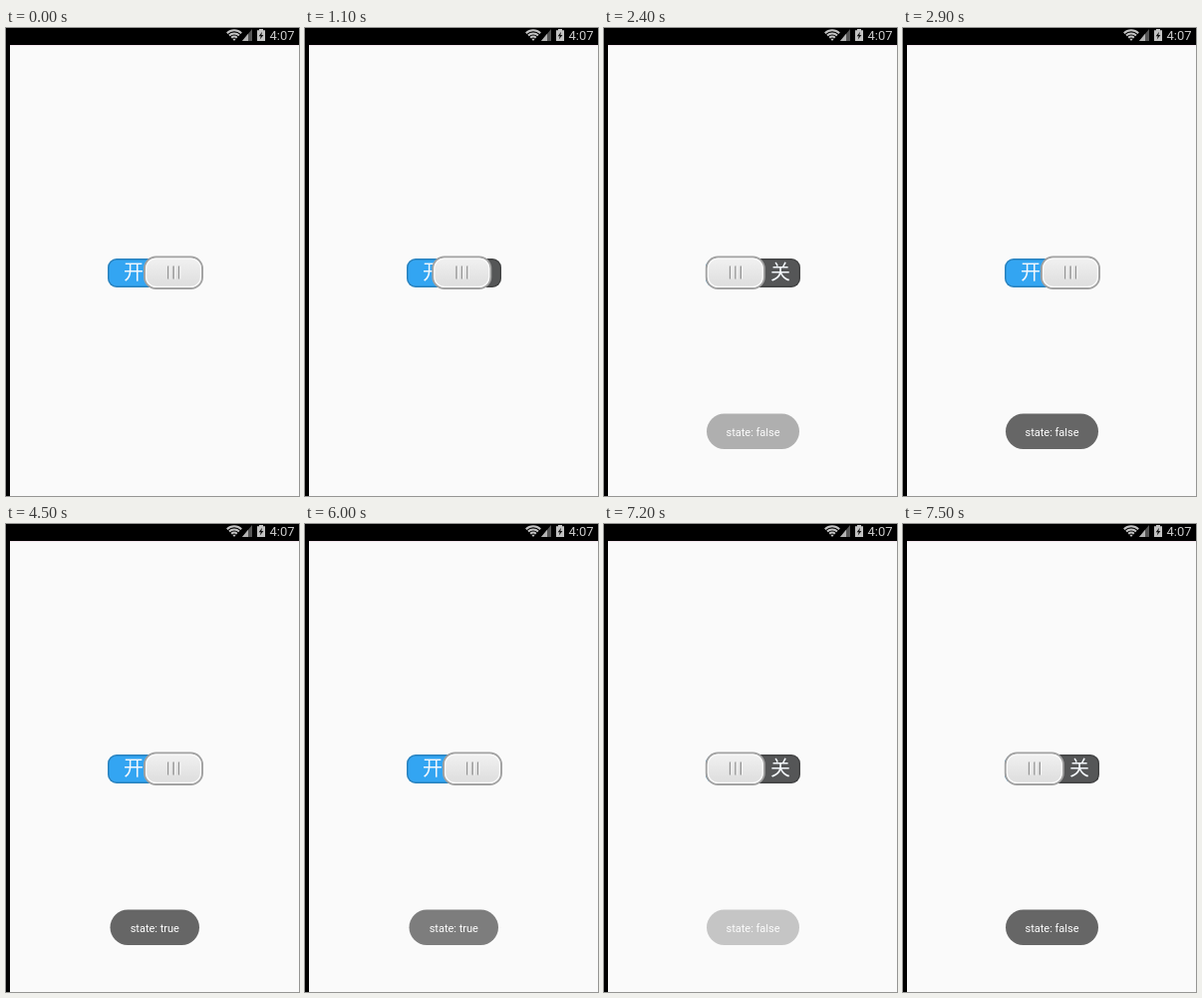
These frames come from a looping animation (294x469 px, 8700 ms). An HTML page:

```html
<!DOCTYPE html>
<html lang="zh">
<head>
<meta charset="utf-8">
<title>Toggle switch</title>
<style>
  html, body { margin: 0; width: 100%; height: 100%; overflow: hidden; background: #000; }
  svg { display: block; width: 294px; height: 469px; }
  text { font-family: Roboto, sans-serif; }
  .label { font: 20px "Noto Sans CJK SC", "Noto Sans CJK", sans-serif; fill: #f4f8fc; text-anchor: middle; }
  .toast rect { fill: #666; }
  .toast text { font-size: 11px; fill: #fff; text-anchor: middle; }
</style>
</head>
<body>
<svg viewBox="0 0 294 469">
  <defs>
    <linearGradient id="face" x2="0" y2="1">
      <stop offset="0" stop-color="#f2f2f2"/>
      <stop offset="1" stop-color="#dcdcdc"/>
    </linearGradient>
    <clipPath id="track"><rect x="102" y="231" width="95" height="29" rx="9"/></clipPath>
  </defs>

  <rect width="294" height="469"/>
  <rect x="4" y="17" width="290" height="452" fill="#fafafa"/>
  <rect x="4" y="17" width="290" height="1" fill="#f4e6ee"/>

  <!-- status bar -->
  <g fill="none" stroke="#c4c4c4" stroke-width="2">
    <path d="M221.8 5.2a10.3 10.3 0 0 1 14.4 0M224 7.5a7.1 7.1 0 0 1 10 0M226.2 9.7a4 4 0 0 1 5.6 0"/>
  </g>
  <path d="M229 13l-1.7-2.2h3.4z" fill="#c4c4c4"/>
  <path d="M237 13h10V1z" fill="#555"/>
  <path d="M237 13h6V5.8z" fill="#b4b4b4"/>
  <path d="M254 1h4v1.3h2V13h-8V2.3h2z" fill="#c4c4c4"/>
  <path d="M257 3.8l-3.3 4.4h2l-.9 3.4 3.6-4.6h-2.1z" fill="#111"/>
  <text x="264.5" y="12" font-size="13" fill="#c8c8c8">4:07</text>

  <!-- switch -->
  <g clip-path="url(#track)">
    <rect x="102" y="231" width="48" height="29" fill="#33a5f2"/>
    <rect x="150" y="231" width="47" height="29" fill="#555657"/>
    <rect x="102" y="231" width="95" height="29" rx="9" fill="none" stroke="#000" stroke-opacity=".22" stroke-width="3"/>
  </g>
  <text class="label" x="128" y="252.3">开</text>
  <text class="label" x="177" y="252.3">关</text>
  <g id="knob">
    <rect x="1" y="229.5" width="58" height="31.5" rx="11.5" fill="url(#face)" stroke="#a2a2a2" stroke-width="2"/>
    <rect x="2.6" y="231.1" width="54.8" height="28.3" rx="10" fill="none" stroke="#fafafa" stroke-width="1.3"/>
    <path d="M24.8 238.5v13M30.2 238.5v13M35.6 238.5v13" stroke="#929292" stroke-width="1.5"/>
    <path d="M26 238.5v13M31.4 238.5v13M36.8 238.5v13" stroke="#fafafa"/>
  </g>

  <!-- messages -->
  <rect id="ghost" x="104.5" y="386.5" width="89.5" height="35.5" rx="17.7" fill="#fff" opacity=".3"/>
  <g class="toast" id="off">
    <rect x="103" y="386.5" width="93" height="35.5" rx="17.7"/>
    <text x="149.5" y="409">state: false</text>
  </g>
  <g class="toast" id="on">
    <rect x="104.5" y="386.5" width="89.5" height="35.5" rx="17.7"/>
    <text x="149.3" y="409">state: true</text>
  </g>
</svg>
<script>
  const LOOP = 8700, STEP = 100;
  const LEFT = 101.8, RIGHT = 138;
  const el = id => document.getElementById(id);
  const knob = el('knob'), off = el('off'), on = el('on'), ghost = el('ghost');

  // Knob position from each time on
  const moves = [
    [0, RIGHT], [1100, 127.3], [1200, RIGHT],
    [1700, 127.3], [1800, 112], [1900, LEFT],
    [2800, 126], [2900, RIGHT],
    [6700, 112.3], [6800, LEFT]
  ];

  function fade(t, start, length = 400) {
    const k = Math.min(1, Math.max(0, (t - start) / length));
    return k * k * (3 - 2 * k);
  }

  function draw(now) {
    const t = Math.floor(now % LOOP / STEP) * STEP;
    const x = moves.filter(m => m[0] <= t).pop()[1];
    knob.setAttribute('transform', `translate(${x} 0)`);
    off.style.opacity = fade(t, 2200) - fade(t, 4000) + fade(t, 7000, 500);
    on.style.opacity = fade(t, 4100) - fade(t, 5900);
    ghost.style.display = t >= 6300 && t < 7100 ? '' : 'none';
  }

  let start;
  function tick(now) {
    start ??= now;
    draw(now - start);
    requestAnimationFrame(tick);
  }
  draw(0);
  requestAnimationFrame(tick);
</script>
</body>
</html>
```
